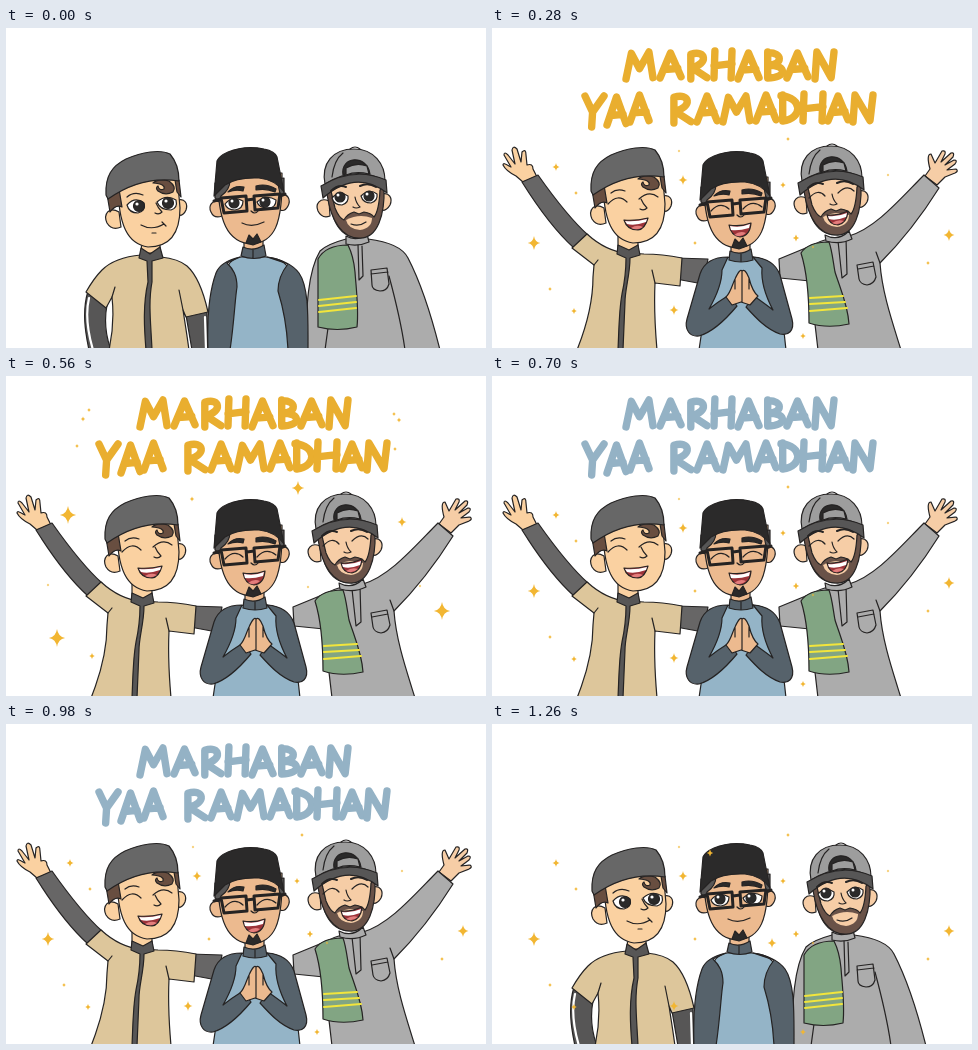
An HTML page for the animation above (1400 ms loop, 480 by 320 pixels).

```html
<!DOCTYPE html>
<html lang="ms">
<head>
<meta charset="utf-8">
<title>Marhaban Yaa Ramadhan</title>
<style>
html, body { margin: 0; width: 100%; height: 100%; overflow: hidden; background: #fff; }
svg { display: block; width: 100vw; height: 100vh; }
.ink { stroke: #252323; stroke-width: 1.2; stroke-linejoin: round; stroke-linecap: round; }
.line { fill: none; }
.bare { stroke: none; }
.skin { fill: #fad1a1; } .tanned { fill: #ecba8f; } .fair { fill: #f6cda6; }
.shirt { fill: #ddc69b; } .dark { fill: #575656; } .sleeve { fill: #676666; } .hat { fill: #676767; }
.slate { fill: #56626b; } .blue { fill: #94b4c7; } .grey { fill: #acacac; } .cap { fill: #9d9d9d; }
.towel { fill: #82a583; } .black { fill: #2b2a2a; } .brown { fill: #684e40; }
.beard { fill: #695248; } .white { fill: #fff; } .red { fill: #9c3339; } .pink { fill: #e37d7c; }
.stripe { fill: none; stroke: #f2e53c; stroke-width: 2; }
.trim { fill: none; stroke: #fff; stroke-width: 2.2; }
.brow { fill: none; stroke-width: 2; }
.bold { stroke-width: 3; }
#text { fill: none; stroke-width: 7.4; stroke-linecap: round; stroke-linejoin: round; }
.star { fill: #f2b632; }
.joy .calm, svg:not(.joy) .happy { display: none; }
.joy #left { transform: translate(-1px, -4px); }
.joy #mid { transform: translate(0, 4px); }
.joy #right { transform: translate(-9px, -3px); }
</style>
</head>
<body>
<svg id="stage" viewBox="0 0 480 320" preserveAspectRatio="none">
<g id="text" role="img" aria-label="MARHABAN YAA RAMADHAN"></g>

<g class="ink calm">
  <!-- man on the left -->
  <path class="dark" d="M82 263C76 283 79 303 83 322H105C99 306 98 293 101 277Z"/>
  <path class="trim" d="M83 270C79 287 82 305 87 322"/>
  <path class="dark" d="M180 287L186 322H202L201 284Z"/>
  <path class="trim" d="M199 289L200 322"/>
  <path class="shirt" d="M135 227C113 229 101 237 96 242C89 249 84 257 80 264L100 280L106 269C108 288 107 304 103 322H183C181 307 179 295 177 282L180 289L202 284C198 266 191 247 181 238C175 233 165 230 155 229Z"/>
  <path class="line" d="M106 269L109 259M177 282L173 262"/>
  <path class="skin" d="M136 211L135 225H154V211Z"/>
  <path class="dark" d="M135 220L144 226L154 219L157 230L146 233L146 254C142 275 145 297 146 322H140C138 298 137 276 142 254L141 233L133 230Z"/>
  <!-- man on the right -->
  <path class="grey" d="M314 223C302 243 300 278 300 322H434C426 290 416 257 402 230C396 218 378 213 362 211L340 211C329 214 320 217 314 223Z"/>
  <path class="line" d="M319 322L322 300M383 248C390 274 396 300 399 322M352 216L353 252L357 248L356 218"/>
  <path class="grey" d="M365 242L381 240L383 256Q381 263 374 263Q366 262 366 257ZM365 246L382 244"/>
  <path class="grey" d="M340 208Q351 214 361 206L363 214Q352 219 340 216Z"/>
  <path class="towel" d="M342 217C328 217 317 222 312 231L312 299Q331 304 351 299C353 281 350 259 349 244C348 233 346 225 342 217Z"/>
  <path class="stripe" d="M313 272L350 268M313 278L350 274M313 284L350 280"/>
  <!-- man in the middle -->
  <path class="blue" d="M235 229C223 231 217 240 219 262L223 322H283L285 245C280 232 270 230 260 229Z"/>
  <path class="slate" d="M234 229C221 232 213 237 210 245C203 264 201 294 202 322H224C228 296 229 271 231 259C231 247 227 241 221 235Z"/>
  <path class="slate" d="M261 229C275 231 286 236 293 245C303 259 302 290 302 322H282C281 300 277 279 272 263C272 250 278 241 282 236Z"/>
  <path class="tanned" d="M238 209V224H257V209Z"/>
  <path class="slate" d="M237 219Q247 224 258 217L260 228Q248 233 235 228ZM247 222V230"/>
</g>

<g class="ink happy">
  <!-- man on the left -->
  <path class="skin" d="M31 154L24 148C18 145 13 141 11 137Q11 134 17 138L19 139L12 127Q12 123 16 127L23 136L20 122Q21 117 25 121L29 134L30 124Q34 120 34 127L35 137Q41 135 41 141L45 149Z"/>
  <path class="sleeve" d="M30 154L46 147C58 164 77 190 96 207L82 220C62 202 45 178 30 154Z"/>
  <path class="sleeve" d="M184 230L216 231L211 256L184 251Z"/>
  <path class="shirt" d="M95 206C106 216 120 224 135 225L152 226C166 226 180 228 190 230L188 258L163 255C162 276 163 299 165 322H85C93 302 101 278 101 249L102 237L80 220Z"/>
  <path class="line" d="M102 237L106 232M163 255L160 242"/>
  <path class="skin" d="M126 207V223H146V207Z"/>
  <path class="dark" d="M126 217L137 222L146 217L148 227L138 230C138 247 133 261 133 274L131 322H126C127 300 127 282 130 266C133 252 134 242 134 230L125 226Z"/>
  <!-- man on the right -->
  <path class="fair" d="M433 148L438 141Q434 126 439 126L443 135L450 123Q454 122 453 126L449 134L459 125Q463 124 461 129L453 137L462 132Q466 132 463 136L455 142L464 141Q467 143 463 145L453 149L445 157Z"/>
  <path class="grey" d="M287 231L321 217C329 212 342 209 357 208C384 200 408 171 432 147L447 160C432 184 412 211 388 235C390 264 400 293 409 322H326L318 253L288 250Z"/>
  <path class="line" d="M388 235L384 224M346 213L350 250L355 246L354 210"/>
  <path class="grey" d="M365 237L381 234L384 249Q382 256 375 257Q368 256 367 251ZM366 241L382 238"/>
  <path class="grey" d="M333 207Q346 214 357 203L360 211Q348 217 334 213Z"/>
  <path class="towel" d="M337 214C323 214 314 217 309 225C315 244 317 270 317 295Q335 301 357 296C356 277 348 260 343 244C341 233 340 222 337 214Z"/>
  <path class="stripe" d="M318 270L351 268M318 276L353 274M318 283L355 280"/>
  <!-- man in the middle -->
  <path class="blue" d="M238 229C222 232 215 241 216 261L207 322H294L286 248C280 233 271 230 260 229Z"/>
  <path class="slate" d="M236 229C222 229 212 234 208 246L195 291C192 302 198 309 207 308C221 304 235 290 245 278L237 267C229 272 222 277 217 281C225 267 230 255 230 242Z"/>
  <path class="slate" d="M261 229C275 230 284 236 288 247L300 291C303 303 296 308 288 306C274 301 264 290 254 279L262 268C269 273 276 278 281 282C273 267 269 253 270 240Z"/>
  <path class="tanned" d="M249 274L240 277L234 269C239 264 240 257 243 251Q248 240 250 243Q253 240 257 250C259 258 261 264 266 268L258 277ZM250 243V274M243 251L243 261M257 250L257 261"/>
  <path class="tanned" d="M239 213V229H258V213Z"/>
  <path class="slate" d="M238 223Q249 228 259 221L261 232Q249 236 237 232ZM249 226V233"/>
</g>

<g id="left" class="ink">
  <path class="skin" d="M113 184C103 178 97 186 101 195Q106 203 115 199ZM172 172C179 170 182 176 180 182Q177 189 171 187Z"/>
  <path class="skin" d="M112 155C112 198 122 216 142 219C165 219 174 203 174 180L171 145Z"/>
  <path class="brown" d="M101 166L113 161L116 179Q110 176 104 184ZM169 152H173L175 169L171 164Z"/>
  <path class="brown" d="M147 155Q153 150 163 153Q171 159 167 164Q159 168 152 163Q149 160 152 158Q153 163 158 161Q160 156 147 155Z"/>
  <path class="hat" d="M100 167C99 148 106 138 120 131C136 124 154 121 164 126C170 133 173 143 173 153C148 149 123 156 102 171Z"/>
  <path class="line" d="M150 175Q152 180 156 184Q153 187 149 185"/>
  <g class="calm">
    <path class="white" d="M121 177Q129 168 138 175Q140 183 132 185Q123 185 121 177ZM151 174Q160 166 170 172Q172 180 165 182Q154 182 151 174Z"/>
    <circle class="black" cx="133" cy="178" r="5.5"/><circle class="black" cx="162" cy="175" r="5.5"/>
    <circle class="white bare" cx="131" cy="176" r="1.6"/><circle class="white bare" cx="160" cy="173" r="1.6"/>
    <path class="line" d="M121 169Q128 163 137 167M135 197Q146 203 158 196M156 194L160 198M146 205H150"/>
  </g>
  <g class="happy">
    <path class="line" d="M117 180Q127 169 136 178M148 175Q158 166 167 173M120 169Q126 164 134 167"/>
    <path class="red" d="M133 196Q145 197 157 194Q154 205 147 206Q136 206 133 196Z"/>
    <path class="white bare" d="M134 197Q145 198 156 195L155 198Q144 202 136 200Z"/>
    <path class="pink bare" d="M140 204Q146 200 152 203Q146 207 140 204Z"/>
  </g>
</g>

<g id="right" class="ink">
  <path class="fair" d="M323 173C314 169 309 176 312 183Q316 191 324 188ZM376 166C383 164 387 170 384 177Q380 184 374 182Z"/>
  <path class="fair" d="M322 150C322 188 331 209 352 210C369 210 378 189 377 146Z"/>
  <path class="beard" d="M321 166L325 163L329 180Q333 190 338 192Q341 186 348 184L353 186L358 184Q365 185 368 189Q373 183 374 162L378 159C379 186 372 211 353 210C337 210 325 194 321 166Z"/>
  <path class="fair bare" d="M340 192Q353 185 366 190Q366 200 354 202Q342 201 340 192Z"/>
  <path class="cap" d="M319 156C315 135 327 121 348 121C368 121 379 136 379 153Q350 137 319 156Z"/>
  <path class="line" d="M344 121Q349 117 354 121M337 125Q328 132 326 149"/>
  <path class="dark" d="M315 158Q348 138 380 152L381 165Q350 141 317 170Z"/>
  <path class="black" d="M337 147C334 128 361 126 364 146Q350 141 337 147Z"/>
  <path class="cap" d="M340 140Q350 134 361 138L363 146Q350 143 340 147Z"/>
  <path class="line" d="M349 169Q350 175 354 179Q350 181 347 179"/>
  <g class="calm">
    <path class="white" d="M326 170Q333 162 342 168Q343 175 336 177Q328 177 326 170ZM355 168Q363 160 371 166Q372 173 365 175Q357 175 355 168Z"/>
    <circle class="black" cx="334" cy="169" r="5"/><circle class="black" cx="363" cy="168" r="5"/>
    <circle class="white bare" cx="332" cy="167" r="1.5"/><circle class="white bare" cx="361" cy="166" r="1.5"/>
    <path class="line" d="M345 196Q353 199 360 194"/>
  </g>
  <g class="happy">
    <path class="line" d="M326 173Q335 163 342 171M355 168Q364 159 371 166"/>
    <path class="red" d="M344 190Q354 191 365 186Q364 198 355 200Q346 200 344 190Z"/>
    <path class="white bare" d="M345 191Q355 192 364 188L363 192Q353 196 346 194Z"/>
    <path class="pink bare" d="M349 198Q355 194 361 196Q355 201 349 198Z"/>
  </g>
  <path class="brow" d="M325 163Q332 156 340 159M354 158Q362 154 370 159"/>
</g>

<g id="mid" class="ink">
  <path class="tanned" d="M214 174C206 171 202 178 205 184Q208 191 216 188ZM275 167C282 165 285 172 282 178Q279 184 274 182Z"/>
  <path class="tanned" d="M212 145C211 194 222 215 246 216C268 214 277 198 276 145Z"/>
  <path class="dark" d="M209 155L224 152Q224 162 215 168L214 173L209 170ZM271 151L278 150L278 166L274 166Z"/>
  <path class="black" d="M208 168L211 133Q213 128 222 124Q239 117 258 121Q269 123 271 129L278 164Q270 152 253 150Q231 149 219 157Z"/>
  <path class="black" d="M222 164Q228 157 238 159L237 163Q230 161 222 164ZM250 158Q260 155 270 161L269 164Q260 160 250 162Z"/>
  <path class="black" d="M240 215L243 207L247 211L251 206L255 214L247 217Z"/>
  <path class="line" d="M245 183Q249 187 252 183"/>
  <g class="calm">
    <path class="white" d="M219 176Q226 167 237 173Q237 181 229 182Q221 182 219 176ZM251 174Q260 166 270 172Q270 180 262 180Q253 180 251 174Z"/>
    <circle class="black" cx="228" cy="175" r="5"/><circle class="black" cx="259" cy="174" r="5"/>
    <circle class="white bare" cx="226" cy="173" r="1.5"/><circle class="white bare" cx="257" cy="172" r="1.5"/>
    <path class="line" d="M236 195Q246 200 258 194"/>
  </g>
  <g class="happy">
    <path class="line" d="M219 179Q228 169 237 177M251 177Q260 167 270 175"/>
    <path class="red" d="M237 193Q248 195 259 191Q258 204 248 205Q239 204 237 193Z"/>
    <path class="white bare" d="M238 194Q249 196 258 192L257 196Q247 199 239 198Z"/>
    <path class="pink bare" d="M242 203Q248 198 254 201Q249 206 242 203Z"/>
  </g>
  <path class="line bold" d="M215 170L240 168L241 183L218 185ZM248 168L274 166L272 180L249 182ZM241 172L248 171M215 171L208 173M274 168L279 166"/>
</g>

<g id="big" class="star"></g>
<g id="small" class="star"></g>
</svg>

<script>
const $ = id => document.getElementById(id);
const stage = $('stage');

// Letter strokes inside a unit box
const glyphs = {
  M: 'M0 1 L.2 .05 L.5 .62 L.85 0 L1 .95',
  A: 'M0 1 L.5 0 L1 .95 M.2 .66 L.85 .62',
  R: 'M.1 1 L.1 .05 C.95 -.15 1.1 .42 .15 .56 L1 .95',
  H: 'M.05 0 L0 1 M1 0 L.95 1 M0 .55 L1 .47',
  B: 'M.1 0 L.1 1 C1.25 1 1.25 .5 .15 .5 C1 .5 1 0 .1 .03',
  N: 'M0 1 L.1 0 L.85 .95 L1 0',
  Y: 'M0 0 L.4 .52 L1 0 M.4 .52 L.35 1',
  D: 'M.1 0 L.1 1 C1.3 .9 1.3 .1 0 .03'
};
// letter, left, top, width, height
const letters = `M 134 24 27 27,A 168 25 21 25,R 197 25 18 26,H 222 23 18 27,
A 246 25 21 26,B 274 24 17 26,A 295 25 21 25,N 323 24 19 27,
Y 93 68 19 31,A 115 69 19 28,A 138 67 19 27,
R 180 68 19 27,A 205 68 20 26,M 231 68 27 26,A 264 67 20 26,
D 289 67 17 26,H 311 66 20 27,A 336 68 20 25,N 361 67 20 27`;

$('text').innerHTML = letters.split(',').map(s => {
  const [c, x, y, w, h] = s.trim().split(' ');
  return `<path vector-effect="non-scaling-stroke" transform="translate(${x} ${y}) scale(${w} ${h})" d="${glyphs[c]}"/>`;
}).join('');

function star([x, y, r]) {
  const k = r * .13, w = r * .9;
  return `<path d="M${x} ${y - r}Q${x + k} ${y - k} ${x + w} ${y}Q${x + k} ${y + k} ${x} ${y + r}Q${x - k} ${y + k} ${x - w} ${y}Q${x - k} ${y - k} ${x} ${y - r}Z"/>`;
}
const sky = list => list.map(star).join('');

$('big').innerHTML = sky([
  [62, 139, 9], [51, 262, 9], [292, 112, 7], [436, 235, 9], [396, 146, 5],
  [186, 123, 2.5], [42, 209, 1.5], [86, 280, 3], [302, 211, 1.5], [414, 210, 1.5]
]) + `<g class="happy">${sky([
  [83, 34, 2], [77, 43, 2.5], [71, 70, 2], [388, 38, 2], [393, 44, 2.5], [389, 73, 2]
])}</g>`;
$('small').innerHTML = sky([
  [64, 139, 4], [42, 215, 7], [191, 152, 5], [457, 207, 6], [84, 165, 2],
  [296, 111, 2], [291, 157, 3], [304, 210, 3.5], [203, 215, 2], [58, 261, 2],
  [82, 283, 3], [182, 282, 5], [311, 308, 3], [396, 147, 1.5], [436, 235, 2],
  [187, 123, 1.5], [321, 219, 1.5]
]) + `<g class="calm">${sky([[218, 129, 3.5], [280, 219, 5]])}</g>`;

const STEP = 140, GOLD = '#e9ae2f', BLUE = '#94b2c5';
const show = (id, on) => $(id).style.display = on ? '' : 'none';

function draw(now) {
  const n = Math.floor(now / STEP) % 10;
  const blue = n === 3 || n === 5 || n === 7;
  const small = blue || n === 2 || n === 9;
  stage.classList.toggle('joy', n > 0 && n < 8);
  $('text').style.stroke = blue ? BLUE : GOLD;
  show('text', n > 0 && n < 9);
  show('big', n > 0 && !small);
  show('small', small);
}

const start = performance.now();
function tick() {
  draw(performance.now() - start);
  requestAnimationFrame(tick);
}
tick();
</script>
</body>
</html>
```
